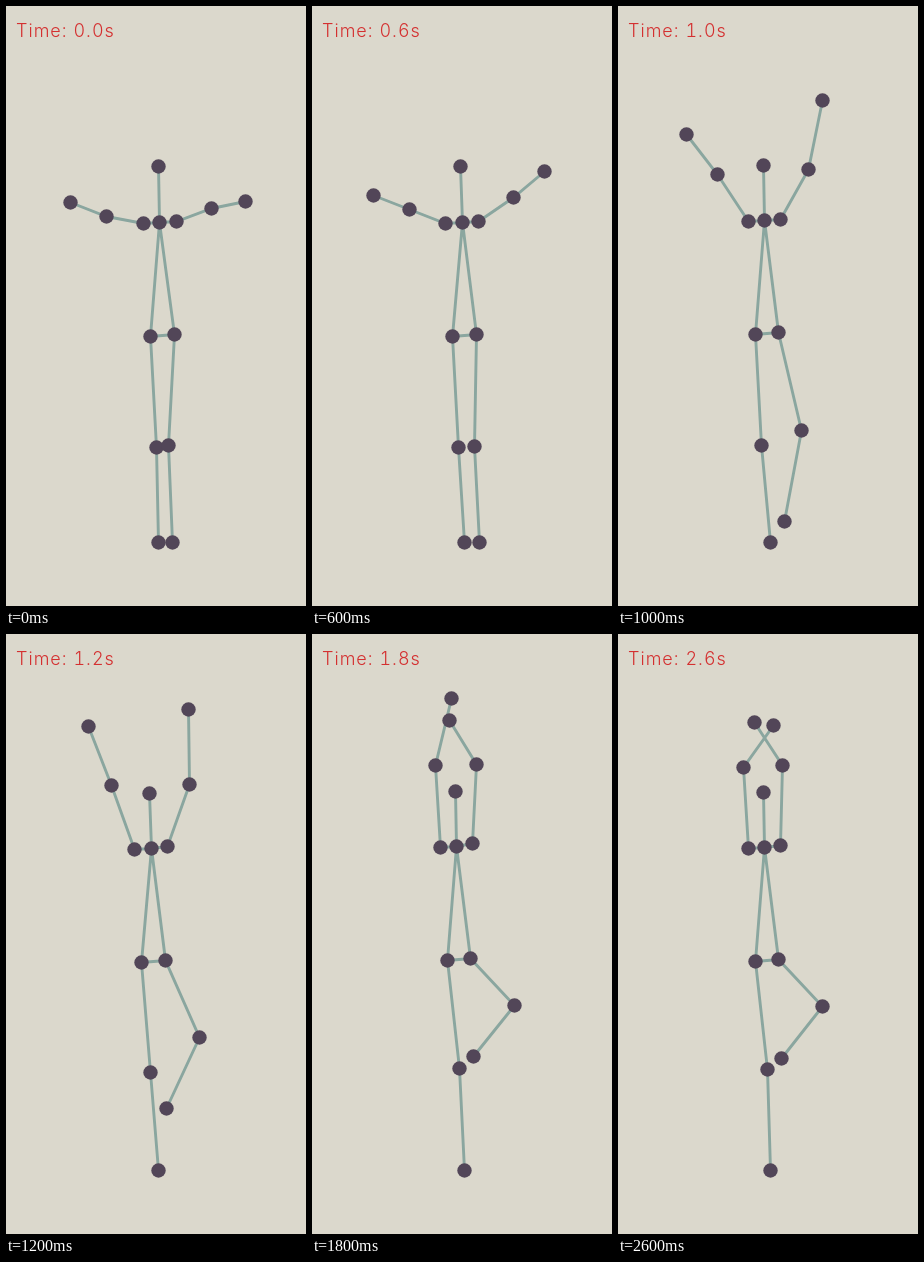
Animation, 300 px wide and 600 px high, one loop 2700 ms. Source, as an HTML page with a canvas:

```html
<!DOCTYPE html>
<html lang="en">
<head>
<meta charset="utf-8">
<title>Stick figure</title>
<style>
  html, body { margin: 0; width: 300px; height: 600px; overflow: hidden; background: #dbd8cc; }
  canvas { display: block; }
  #clock {
    position: absolute; left: 10px; top: 13px;
    font: 300 18px/23px Inter, sans-serif;
    font-variant-numeric: tabular-nums;
    letter-spacing: 1px; white-space: pre; color: #d43030;
  }
</style>
</head>
<body>
<canvas id="stage" width="300" height="600"></canvas>
<div id="clock">Time: 0.0s</div>
<script>
const LOOP = 2700, STEP = 100;
const ctx = document.getElementById('stage').getContext('2d');
const clock = document.getElementById('clock');

const chains = [
  ['head', 'neck'],
  ['neck', 'shoulderL', 'elbowL', 'wristL'],
  ['neck', 'shoulderR', 'elbowR', 'wristR'],
  ['neck', 'hipL', 'kneeL', 'ankleL'],
  ['neck', 'hipR', 'kneeR', 'ankleR'],
  ['hipL', 'hipR']
];

// Smooth 0 to 1 between two moments, in seconds.
function ease(t, start, end) {
  const u = Math.min(1, Math.max(0, (t - start) / (end - start)));
  return u * u * (3 - 2 * u);
}

const turn = (t, from, to, start, end) => from + (to - from) * ease(t, start, end);

// A bone turning in depth: its tip follows an ellipse around its root.
// Degrees count up from horizontal; side is 1 for right, -1 for left.
function swing([x, y], side, width, height, degrees) {
  const a = degrees * Math.PI / 180;
  return [x + side * width * Math.cos(a), y - height * Math.sin(a)];
}

function poseAt(t) {
  const sway = -9.3 * ease(t, 0, 1.4) + 2 * ease(t, 1.8, 2.2);
  const stretch = Math.exp(-(((t - 1.8) / 0.2) ** 2));
  const lift = -2 * ease(t, 0.4, 1.2) - 2.3 * stretch - 1.2 * ease(t, 2.2, 2.6);
  const body = (x, y, share = 1) => [x + sway, y + lift * share];

  const head = body(152, 160, 0.6);
  const neck = body(153.3, 216);
  const shoulderL = body(137, 217);
  const shoulderR = body(169.7, 215, 1.3);
  const hipL = body(144, 330);
  const hipR = body(167.5, 328);

  const elbowL = swing(shoulderL, -1, 37, 82, turn(t, 5, 82, 0.4, 1.8));
  const wristL = swing(elbowL, -1, 37, 75, turn(t, 11, 146, 0.55, 2.35));
  const elbowR = swing(shoulderR, 1, 36, 80, turn(t, 9, 88, 0.25, 2.05));
  const wristR = swing(elbowR, 1, 34, 75, turn(t, 6, 145, 0.29, 1.85));

  const kneeL = swing(hipL, 1, 48, 112, turn(t, -83, -75, 0.8, 1.6));
  const ankleL = [152, 536];
  const kneeR = swing(hipR, 1, 48, 112, turn(t, -97, -25, 0.4, 1.6));
  const ankleR = swing(kneeR, -1, 48, 97, turn(t, -95, -32, 0.65, 1.45));

  return {
    head, neck, shoulderL, shoulderR, hipL, hipR,
    elbowL, wristL, elbowR, wristR, kneeL, ankleL, kneeR, ankleR
  };
}

function draw(t) {
  const pose = poseAt(t);
  for (const name in pose) pose[name] = pose[name].map(v => Math.round(v) + 0.5);

  ctx.fillStyle = '#dbd8cc';
  ctx.fillRect(0, 0, 300, 600);

  ctx.strokeStyle = '#8aa69f';
  ctx.lineWidth = 2.9;
  ctx.beginPath();
  for (const chain of chains) {
    chain.forEach((name, i) => ctx[i ? 'lineTo' : 'moveTo'](...pose[name]));
  }
  ctx.stroke();

  ctx.fillStyle = '#524658';
  for (const [x, y] of Object.values(pose)) {
    ctx.beginPath();
    ctx.arc(x, y, 7.2, 0, Math.PI * 2);
    ctx.fill();
  }
  clock.textContent = `Time: ${t.toFixed(1)}s`;
}

const start = performance.now();
function tick() {
  const elapsed = (performance.now() - start) % LOOP;
  draw(Math.floor(elapsed / STEP) * STEP / 1000);
  requestAnimationFrame(tick);
}
tick();
</script>
</body>
</html>
```
